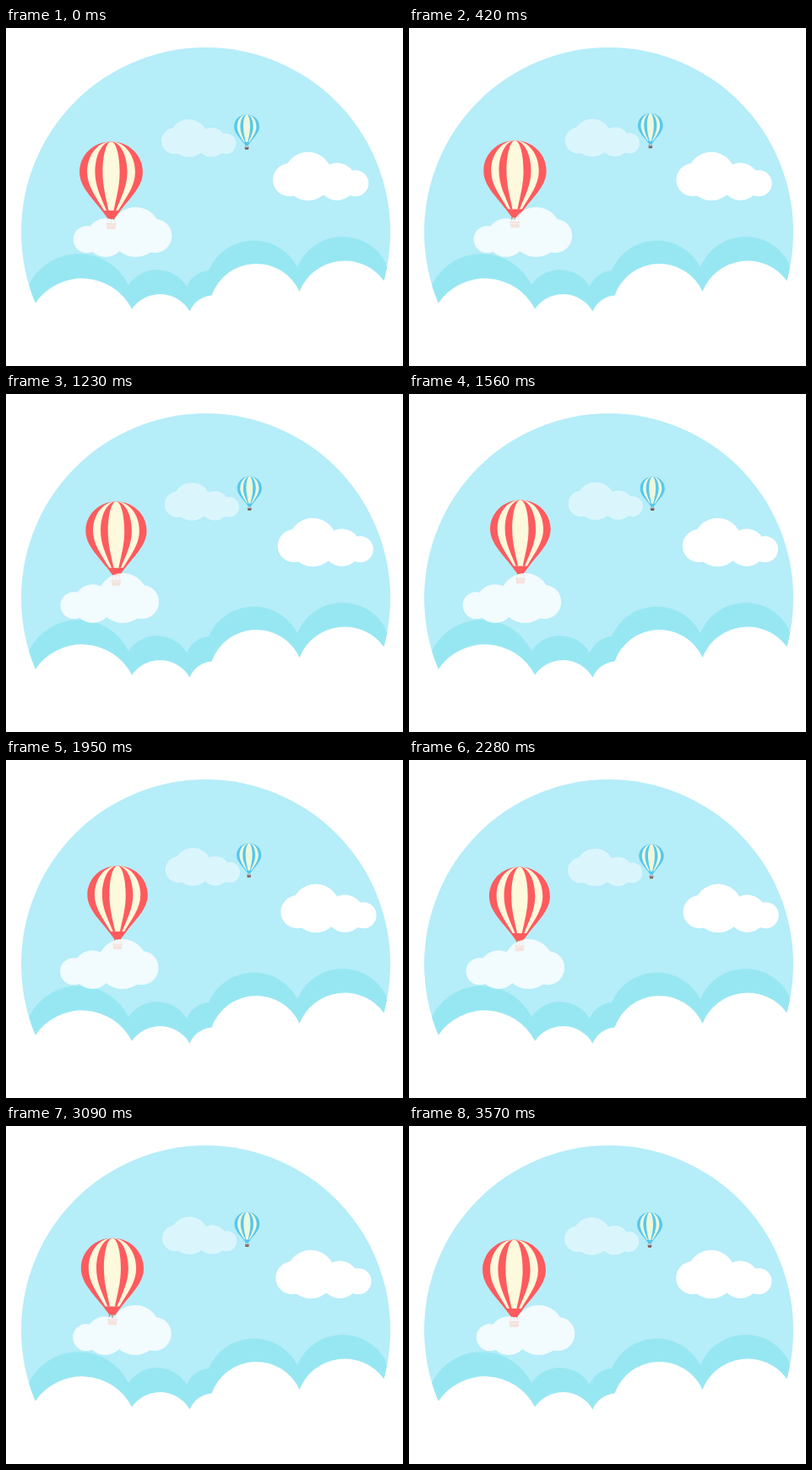
An HTML page that plays this animation: 470x400 px, repeating every 3600 ms.

```html
<!DOCTYPE html>
<html lang="en">
<head>
<meta charset="utf-8">
<title>Balloons</title>
<style>
  html, body { margin: 0; width: 100%; height: 100%; overflow: hidden; background: #fff; }
  svg { display: block; width: 470px; height: 400px; }
</style>
</head>
<body>
<svg viewBox="0 0 470 400" xmlns="http://www.w3.org/2000/svg">
  <defs>
    <clipPath id="disc"><circle cx="236.5" cy="241.5" r="218.5"/></clipPath>
    <clipPath id="panels"><rect x="-40" y="-2" width="80" height="83.5"/></clipPath>
    <g id="puffs">
      <circle cx="19.5" cy="33" r="19.5"/>
      <circle cx="41.5" cy="28.7" r="28.7"/>
      <circle cx="76" cy="35" r="22.2"/>
      <circle cx="97.7" cy="37" r="15.5"/>
    </g>
    <path id="skin" d="M0 0C21 0 37.4 16 37.4 36C37.4 53 23 66 11 81.5L3.5 91.5H-3.5L-11 81.5C-23 66 -37.4 53 -37.4 36C-37.4 16 -21 0 0 0Z"/>
  </defs>

  <circle cx="236.5" cy="241.5" r="218.5" fill="#b5edf9"/>
  <path clip-path="url(#disc)" fill="#97e7f2" d="M28 302A65.7 65.7 0 0 1 145 304A41 41 0 0 1 214 306A30.3 30.3 0 0 1 240 287A58 58 0 0 1 345 283A57.6 57.6 0 0 1 450 279L470 400H0Z"/>
  <path fill="#fff" d="M34.5 326A66.5 66.5 0 0 1 149 332.5A40.5 40.5 0 0 1 217.5 335.5A30 30 0 0 1 243.5 316.5A56 56 0 0 1 347.5 312A57.3 57.3 0 0 1 447.5 299.5H470V400H0V326Z"/>

  <g id="paleCloud" opacity=".5" fill="#fff"><use href="#puffs"/></g>
  <g id="whiteCloud" fill="#fff"><use href="#puffs"/></g>
  <g id="blueBalloon"></g>
  <g id="redBalloon"></g>
  <g id="nearCloud" opacity=".83" fill="#fff"><use href="#puffs"/></g>
</svg>
<script>
  const LOOP = 3600, STEP = 30;
  const el = id => document.getElementById(id);

  // Envelope with nested stripes, then ropes and basket; the origin is the crown.
  function buildBalloon(id, main, stripe, basket) {
    const panels = [.76, .51, .27].map((k, i) =>
      `<use href="#skin" transform="scale(${k} 1)" fill="${i % 2 ? main : stripe}"/>`).join('');
    el(id).innerHTML =
      `<use href="#skin" fill="${main}"/>
       <g clip-path="url(#panels)">${panels}</g>
       <path d="M-3.3 91L-5 98M0 91V98M3.3 91L5 98" fill="none" stroke="${basket}" stroke-width=".8"/>
       <path d="M-6 96.5H6V98.5H-6ZM-5.5 99H5.5L5 103.5H-5Z" fill="${basket}"/>`;
  }

  const clamp = x => Math.min(1, Math.max(0, x));
  const linear = x => x;
  const sine = x => (1 - Math.cos(Math.PI * x)) / 2;
  const mix = (a, b, p) => a + (b - a) * p;

  // 0 to 1 between a and b, back to 0 between c and d.
  const swing = (t, a, b, c, d, ease) =>
    ease(clamp((t - a) / (b - a))) - ease(clamp((t - c) / (d - c)));

  function place(id, x, y, sx, sy = sx) {
    el(id).setAttribute('transform', `translate(${x} ${y}) scale(${sx} ${sy})`);
  }

  function draw(t) {
    const rise = swing(t, 0, 1800, 1800, 3600, sine);
    const bob = swing(t, 0, 1260, 1260, 3600, sine);
    const right = swing(t, 360, 1800, 2160, 3600, linear);
    const left = swing(t, 0, 1440, 1800, 3270, sine);

    place('paleCloud', mix(184, 188.8, rise), mix(108, 104, rise), .78);
    place('whiteCloud', mix(316, 325.3, right), 146.8, 1);
    place('nearCloud', mix(196.3, 180.2, left), 212, -1.03, 1.03);
    place('redBalloon', mix(124.5, 132.2, rise), mix(134.5, 125, rise), mix(1, .955, rise));
    place('blueBalloon', mix(285, 288.3, bob), mix(102.3, 97.5, bob), mix(.4, .39, bob));
  }

  buildBalloon('redBalloon', '#fe5b5e', '#fdf9dc', '#c8562e');
  buildBalloon('blueBalloon', '#55c8ee', '#edf8dc', '#85524c');

  const start = performance.now();
  function tick() {
    const t = (performance.now() - start) % LOOP;
    draw(Math.floor(t / STEP) * STEP);
    requestAnimationFrame(tick);
  }
  draw(0);
  requestAnimationFrame(tick);
</script>
</body>
</html>
```
